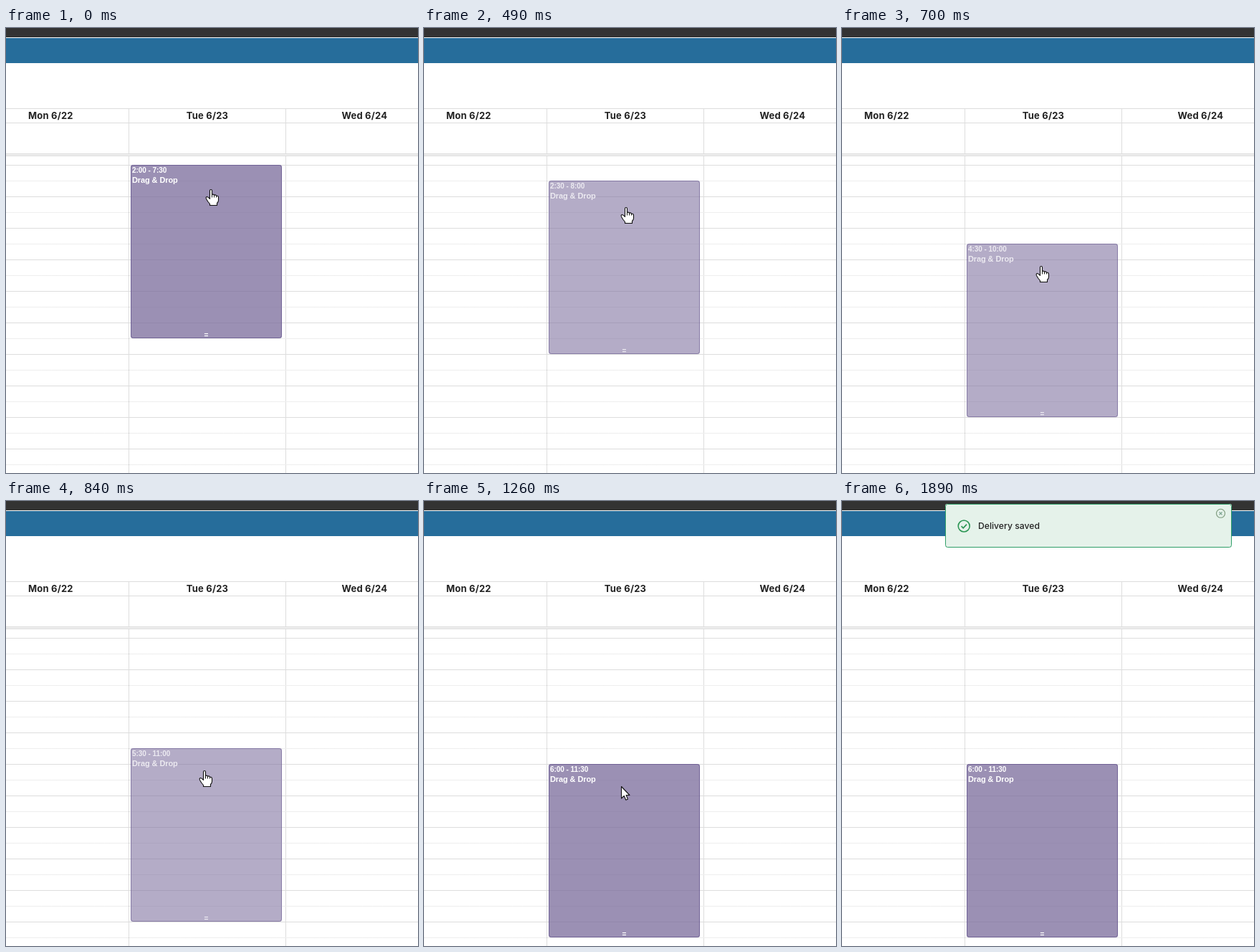
Recreate the animation shown at these times as an HTML page with a canvas. Size 575x621 px, loop 2100 ms.

```html
<!DOCTYPE html>
<html lang="en">
<head>
<meta charset="utf-8">
<title>Calendar drag and drop</title>
<style>
  html, body { margin: 0; width: 100%; height: 100%; overflow: hidden; background: #fff; }
  canvas { display: block; }
</style>
</head>
<body>
<canvas id="stage" width="575" height="621"></canvas>
<script>
const ctx = document.getElementById('stage').getContext('2d');
const W = 575, H = 621, LOOP = 2100, STEP = 70;
const SLOT = 22, FIRST_Y = 191, GRAB_Y = 230;
const UI = 'Inter, "Liberation Sans", sans-serif';
const LABEL = '"Liberation Sans", Arial, sans-serif';

// Pointer stops: time, x, y. Each holds until the next one.
const stops = [
  [0, 286, 225], [420, 285, 230], [490, 282, 250], [560, 279, 277],
  [630, 278, 303], [700, 278, 332], [770, 277, 356], [840, 277, 376],
  [910, 277, 388], [980, 277, 398], [1260, 275.5, 398.5], [1540, 281, 407],
  [1610, 390.5, 488.5], [1680, 448, 540], [1750, 482, 574], [1820, 504, 598]
];
const DRAG_START = 490, DROP = 1190, ARROW = 1260, SAVED = 1540, GONE = 1890;

function rect(color, x, y, w, h) {
  ctx.fillStyle = color;
  ctx.fillRect(x, y, w, h);
}

function text(str, x, y, font, color, align = 'left', spacing = 0) {
  ctx.font = font;
  ctx.fillStyle = color;
  ctx.textAlign = align;
  ctx.letterSpacing = spacing + 'px';
  ctx.fillText(str, x, y);
}

function line(points, color, width = 1) {
  ctx.beginPath();
  points.forEach(([x, y]) => ctx.lineTo(x, y));
  ctx.strokeStyle = color;
  ctx.lineWidth = width;
  ctx.stroke();
}

function ring(x, y, r, color, width) {
  ctx.beginPath();
  ctx.arc(x, y, r, 0, Math.PI * 2);
  ctx.strokeStyle = color;
  ctx.lineWidth = width;
  ctx.stroke();
}

function box(x, y, w, h, r, fill, border) {
  ctx.beginPath();
  ctx.roundRect(x, y, w, h, r);
  ctx.fillStyle = fill;
  ctx.fill();
  ctx.beginPath();
  ctx.roundRect(x + 0.5, y + 0.5, w - 1, h - 1, r);
  ctx.strokeStyle = border;
  ctx.lineWidth = 1;
  ctx.stroke();
}

function drawPage() {
  rect('#fff', 0, 0, W, H);
  rect('#333', 0, 0, W, 13);
  rect('#266d9b', 0, 14, W, 35);

  const rule = '#ddd';
  rect(rule, 0, 112, W, 1);
  rect(rule, 0, 132, W, 1);
  for (let y = FIRST_Y, i = 0; y < H; y += SLOT, i++) {
    if (i % 2 === 0) rect(rule, 0, y, W, 1);
    else for (let x = 0; x < W; x += 2) rect(rule, x, y, 1, 1);
  }
  for (const x of [171, 390]) rect(rule, x, 112, 1, H - 112);
  rect(rule, 0, 175, W, 4);
  rect('#eee', 0, 176, W, 2);

  const font = 'bold 13px ' + UI;
  text('Mon 6/22', 62.3, 127, font, '#222', 'center', 0.2);
  text('Tue 6/23', 281, 127, font, '#222', 'center', 0.2);
  text('Wed 6/24', 500.3, 127, font, '#222', 'center', 0.2);
}

function clock(halfHours) {
  return Math.floor(halfHours / 2) + ':' + (halfHours % 2 ? '30' : '00');
}

function drawEvent(slot, dragging) {
  const y = FIRST_Y + slot * SLOT;
  const start = 4 + slot;
  ctx.globalAlpha = dragging ? 0.75 : 1;
  box(174, y, 211, 242, 3, 'rgba(127,113,159,0.78)', 'rgba(96,80,138,0.7)');
  text(clock(start) + ' - ' + clock(start + 11), 176, y + 11,
    'bold 10px ' + LABEL, '#fff', 'left', -0.05);
  text('Drag & Drop', 176, y + 25, 'bold 11px ' + LABEL, '#fff', 'left', -0.1);
  text('=', 279.5, y + 241, 'bold 10px ' + LABEL, '#fff', 'center');
  ctx.globalAlpha = 1;
}

function drawToast() {
  box(144, 4, 400, 61, 3, '#e5f2ea', '#2f9e68');
  ring(170.2, 35, 8, '#2c9654', 1.6);
  line([[166.6, 35.2], [169.2, 37.8], [174, 32.6]], '#2c9654', 1.7);
  text('Delivery saved', 190, 39, '500 12.2px ' + UI, '#222');
  ring(528.5, 17.3, 6, '#7c9a7c', 1.1);
  line([[526.5, 15.3], [530.5, 19.3]], '#6f9a86', 1.1);
  line([[530.5, 15.3], [526.5, 19.3]], '#6f9a86', 1.1);
}

function fillCursor(path) {
  ctx.fillStyle = '#fff';
  ctx.fill(path);
  ctx.strokeStyle = '#111';
  ctx.lineWidth = 1.1;
  ctx.lineJoin = 'round';
  ctx.stroke(path);
}

const hand = new Path2D(
  'M-1.5 2 Q-1.5 .5 0 .5 Q1.5 .5 1.5 2 V7.5 Q3 6.5 4.5 8 Q6.5 7.5 7.5 9 ' +
  'Q10.5 9 10.5 11.5 V15.5 Q10.5 17.5 8.5 19.5 V22.5 H-1.5 V20.5 L-4 17.5 ' +
  'L-6.5 13.5 Q-7.5 11.5 -6 10.5 Q-4.5 10 -1.5 13.5 Z');
const arrow = new Path2D(
  'M0 0 V16.5 L3.8 13 L6.3 18.7 L9 17.6 L6.6 12 H11.5 Z');

function drawCursor(x, y, isArrow) {
  ctx.save();
  ctx.translate(x, y);
  if (isArrow) {
    fillCursor(arrow);
  } else {
    fillCursor(hand);
    for (const k of [0, 1, 2]) {
      const px = 1.5 + k * 3;
      line([[px, 7 + k], [px, 11.5]], '#111');
    }
  }
  ctx.restore();
}

function draw(time) {
  const t = Math.floor((time % LOOP) / STEP) * STEP;
  const [, x, y] = stops.filter(s => s[0] <= t).pop();
  const dragY = t >= DROP ? 398 : y;
  const slot = Math.max(0, Math.round((dragY - GRAB_Y) / SLOT));

  drawPage();
  drawEvent(slot, t >= DRAG_START && t < DROP);
  if (t >= SAVED) drawToast();
  if (t < GONE) drawCursor(x, y, t >= ARROW);
}

const begin = performance.now();
function tick() {
  draw(performance.now() - begin);
  requestAnimationFrame(tick);
}
tick();
</script>
</body>
</html>
```
